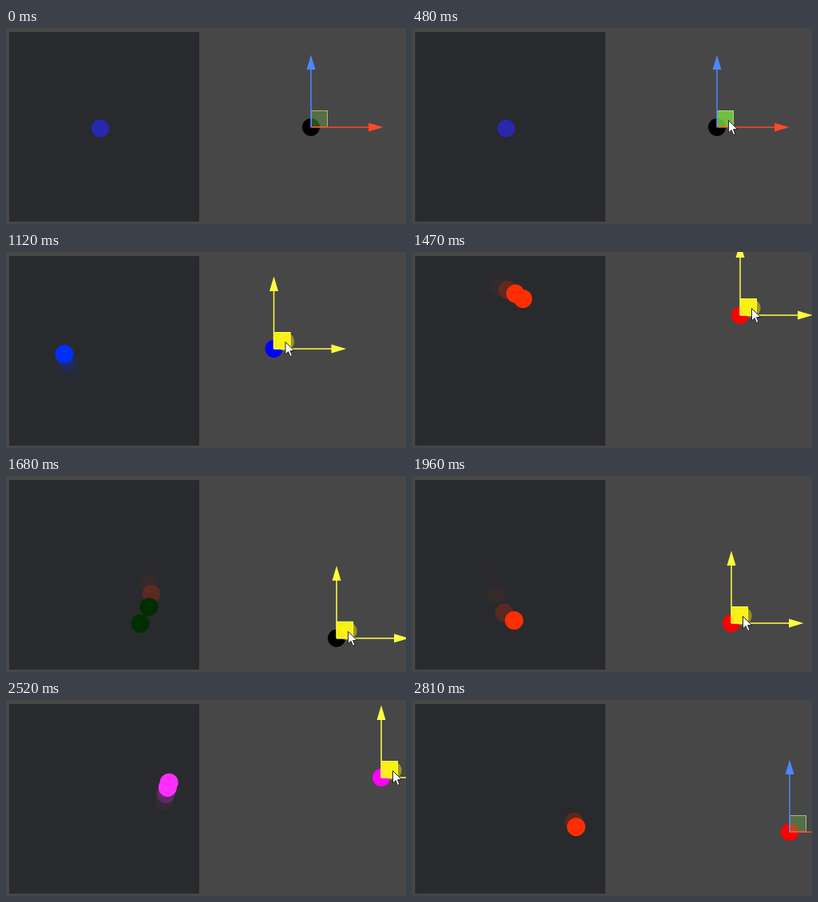
These frames come from a looping animation (501x245 px, 3.34 s). An HTML page with a canvas:

```html
<!DOCTYPE html>
<html lang="en">
<head>
<meta charset="utf-8">
<title>Velocity trail</title>
<style>
html, body { margin: 0; width: 100%; height: 100%; overflow: hidden; background: #474747; }
canvas { display: block; }
</style>
</head>
<body>
<canvas width="501" height="245"></canvas>
<script>
const ctx = document.querySelector('canvas').getContext('2d');
const LOOP = 3340, STEP = 70, GRAB = 8, RELEASE = 40;
const YELLOW = '#ffff40';

// Turning points of the drag: step, x, y.
const knots = [
  [GRAB, 382, 124], [10, 420, 85], [12, 436, 176], [13.5, 365, 182], [15.6, 337, 126], [16, 335.5, 121],
  [18, 333, 58], [19.2, 364, 42], [20.6, 403, 57], [21, 411, 79], [23, 446, 150], [24.2, 404, 208],
  [25.1, 340, 180], [26, 345, 88], [27.2, 378, 167], [28, 400, 184], [30, 374, 200], [31.25, 409, 217],
  [32, 437, 203], [36, 470, 97], [39, 466, 146], [RELEASE, 473, 165]
];

// Smooth curve through the turning points.
function position(step) {
  const t = Math.max(GRAB, Math.min(RELEASE, step));
  const i = Math.max(1, knots.findIndex(k => k[0] >= t));
  const a = knots[i - 1], b = knots[i];
  const before = knots[i - 2] || a, after = knots[i + 1] || b;
  const span = b[0] - a[0], s = (t - a[0]) / span;
  return [1, 2].map(k => {
    const out = span * (b[k] - before[k]) / (b[0] - before[0]);
    const into = span * (after[k] - a[k]) / (after[0] - a[0]);
    return a[k] + (b[k] - a[k]) * s * s * (3 - 2 * s) + s * (1 - s) * (out * (1 - s) - into * s);
  });
}

// Red means moving right, blue means moving up.
function heading(step) {
  const [x, y] = position(step), [px, py] = position(step - 0.2);
  return { red: x > px ? 255 : 0, blue: y < py ? 255 : 0 };
}

function disc(x, y, r, fill) {
  ctx.fillStyle = fill;
  ctx.beginPath();
  ctx.arc(x, y, r, 0, 7);
  ctx.fill();
}

function shape(points, fill) {
  ctx.beginPath();
  points.forEach(p => ctx.lineTo(...p));
  ctx.closePath();
  ctx.fillStyle = fill;
  ctx.fill();
}

// Delayed copies of the ball: the newest are solid, older ones fade.
function trail(step) {
  const solid = step % 3 === 1 ? 1 : 2;
  for (let i = 3; i >= 0; i--) {
    const then = step - 0.4 - 0.35 * i, idle = then <= GRAB;
    const [x, y] = position(then), { red, blue } = heading(then);
    ctx.globalAlpha = Math.min(1, 0.22 ** (i - solid + 1));
    disc(x - 264, y + 1.5, idle ? 11 : 11.5, idle ? '#2828ad' : `rgb(${red},46,${blue})`);
  }
  ctx.globalAlpha = 1;
}

function arrow(x, y, angle, color) {
  ctx.save();
  ctx.translate(x, y);
  ctx.rotate(angle);
  ctx.fillStyle = color;
  ctx.fillRect(0, -0.75, 73, 1.5);
  shape([[72, -5.5], [90.5, 0], [72, 5.5]], color);
  ctx.restore();
}

function gizmo(x, y, held, hover) {
  const [fill, edge] = held ? ['rgba(255,248,20,.94)', YELLOW]
    : hover ? ['rgba(125,220,62,.8)', '#a8d888']
    : ['rgba(100,155,65,.48)', '#9fbb84'];
  ctx.fillStyle = fill;
  ctx.fillRect(x, y - 21, 21, 21);
  ctx.strokeStyle = edge;
  ctx.lineWidth = 1;
  ctx.strokeRect(x + 0.5, y - 20.5, 20, 20);
  arrow(x, y, 0, held ? YELLOW : '#ff4a22');
  arrow(x, y, -Math.PI / 2, held ? YELLOW : '#4a88ff');
}

function cursor(x, y) {
  ctx.save();
  ctx.translate(x, y);
  ctx.strokeStyle = '#222';
  ctx.lineWidth = 1;
  shape([[0.5, 0.5], [0.5, 16], [4, 12.5], [6.5, 18.5], [9, 17.5], [6.5, 11.7], [11.5, 11.5]], '#fff');
  ctx.stroke();
  ctx.restore();
}

function draw(now) {
  const step = Math.min(RELEASE, Math.floor((now % LOOP + 10) / STEP));
  const [x, y] = position(step), { red, blue } = heading(step);
  const held = step >= GRAB && step < RELEASE;
  const away = Math.max(0, 1 - (step - 1) / 5) ** 2;
  const tip = [x + 14 + 30 * away, y - 9 + 65 * away];

  ctx.fillStyle = '#474747';
  ctx.fillRect(0, 0, 501, 245);
  ctx.fillStyle = '#292a2d';
  ctx.fillRect(4, 5, 238, 237);
  trail(step);

  disc(x, y, 11, `rgb(${red},0,${blue})`);
  if (held) disc(...tip, 11.5, 'rgba(255,240,0,.45)');
  gizmo(x, y, held, step > 0 && step < GRAB && tip[1] < y);
  if (step > 0 && step < RELEASE) cursor(...tip);
  requestAnimationFrame(draw);
}
requestAnimationFrame(draw);
</script>
</body>
</html>
```
